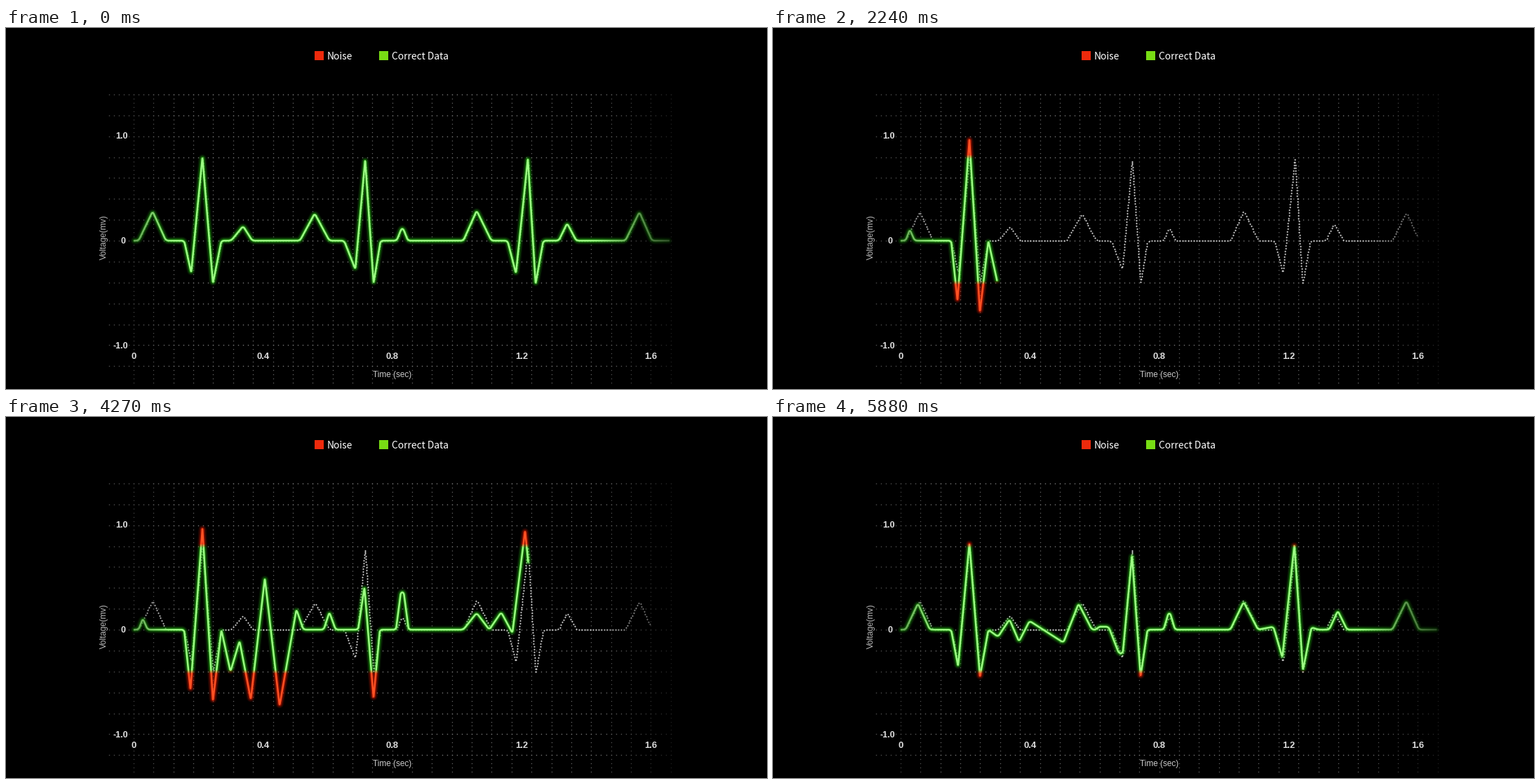
A matplotlib script that plays this animation: 1085 by 516 pixels, repeating every 5950 ms.

```python
import numpy as np
import matplotlib.pyplot as plt
from matplotlib.animation import FuncAnimation
from matplotlib.transforms import Bbox

W, H, DPI = 1085, 516, 100
FRAMES, STEP = 85, 70
FADE_FROM, FADE_TO = 400, 930      # clean trace fades out
DRAW_AT, SPEED = 1216, 0.803       # noisy trace is drawn, px per ms
MORPH_AT, MORPH_LEN = 5293, 707    # noisy trace settles into the clean one
BASE = 304
LEFT, CELL_X = 182, 28.36
TOP, CELL_Y = 95, 29.87

TAIL = [(883, BASE), (903, 263), (921, BASE), (947, BASE)]
NOISY = np.array([
    (182, BASE), (189, BASE), (195, 288), (202, BASE), (254, BASE),
    (263, 390), (280, 158), (295, 406), (307, BASE), (320, 364), (333, 320),
    (349, 404), (369, 230), (390, 413), (414, 275), (424, BASE), (453, BASE),
    (461, 279), (461, 279), (470, BASE), (502, BASE), (511, 243), (524, 402),
    (533, BASE), (556, BASE), (563, 250), (567, 250), (574, BASE),
    (652, BASE), (671, 280), (689, BASE), (706, 279), (722, 309), (740, 162),
    (758, 343), (776, 283), (788, BASE), (817, BASE), (831, 267),
    (845, BASE)] + TAIL, float)
CLEAN = np.array([
    (182, BASE), (189, BASE), (209, 262), (228, BASE), (254, BASE),
    (264, 350), (280, 184), (295, 365), (307, BASE), (321, BASE), (338, 283),
    (351, BASE), (365, BASE), (419, BASE), (440, 265), (461, BASE),
    (463, BASE), (464, BASE), (482, BASE), (498, 345), (498, 345), (512, 188),
    (524, 365), (534, BASE), (557, BASE), (564, 286), (566, 286), (573, BASE),
    (652, BASE), (671, 261), (692, BASE), (715, BASE), (727, 351), (744, 186),
    (755, 366), (766, BASE), (775, BASE), (788, BASE), (800, 279),
    (813, BASE)] + TAIL, float)

GREEN = {"core": (0.62, 1.0, 0.52), "glow": (0.15, 0.70, 0.08)}
RED = {"core": (1.0, 0.32, 0.14), "glow": (0.85, 0.10, 0.0)}
LAYERS = [(11, 0.12, "glow"), (8, 0.22, "glow"),
          (5, 0.5, "glow"), (2.4, 1.0, "core")]
EDGES = [0, 182, 184, 186, 362, 364, 366, H]
REDNESS = [1, 0.67, 0.33, 0, 0.33, 0.67, 1]


def px(size):
    return size * 72 / DPI


def arc_length(pts):
    return np.r_[0, np.cumsum(np.hypot(*np.diff(pts, axis=0).T))]


def resample(pts, step):
    s = arc_length(pts)
    at = np.arange(0, s[-1], step)
    return np.column_stack([np.interp(at, s, pts[:, k]) for k in (0, 1)])


def rounded(pts, reach=4):
    """Sample a polyline every pixel and soften its corners."""
    fine = np.pad(resample(pts, 1), ((reach, reach), (0, 0)), mode="edge")
    box = np.ones(2 * reach + 1) / (2 * reach + 1)
    return np.column_stack([np.convolve(fine[:, k], box, "valid")
                            for k in (0, 1)])


def blend(a, b, k):
    return tuple((1 - k) * np.array(a) + k * np.array(b))


fig = plt.figure(figsize=(W / DPI, H / DPI), dpi=DPI, facecolor="black")
ax = fig.add_axes([0, 0, 1, 1])
ax.axis("off")


def dots(x, y, size, color, marker="s"):
    ax.plot(x, y, ls="none", marker=marker, ms=px(size), mew=0,
            color=color, zorder=1)


def label(x, y, text, size, color, font="Liberation Sans", **kw):
    kw = {"ha": "center", "va": "baseline", **kw}
    ax.text(x, y, text, fontsize=px(size), color=color, family=font,
            zorder=6, **kw)


def draw_grid():
    cols = LEFT + CELL_X * np.arange(28)
    rows = TOP + CELL_Y * np.arange(14)
    vx, vy = np.meshgrid(cols, np.arange(TOP, H - 3, CELL_Y / 5))
    hx, hy = np.meshgrid(np.arange(LEFT - 5 * CELL_X / 4, 948, CELL_X / 4),
                         rows)
    dots(vx.ravel(), vy.ravel(), 1.3, "#646464")
    dots(hx.ravel(), hy.ravel(), 1.4, "#767676")


def draw_shade():
    """Dim the left and right ends of the plot."""
    x = np.arange(W)
    shade = np.zeros((1, W, 4))
    shade[0, :, 3] = np.interp(x, [185, 240, 835, 947], [0.34, 0, 0, 0.7])
    ax.imshow(shade, extent=(0, W, H, 0), aspect="auto", zorder=5,
              interpolation="nearest")


def draw_labels():
    for x, color, name in ((440, "#ee2a0c", "Noise"),
                           (532, "#78dc14", "Correct Data")):
        ax.add_patch(plt.Rectangle((x, 33), 13, 13, color=color, lw=0,
                                   zorder=6))
        label(x + 17.5, 45, name, 13.8, "white", "Noto Sans CJK JP",
              ha="left")
    for k, name in enumerate(("0", "0.4", "0.8", "1.2", "1.6")):
        label(LEFT + 184.3 * k, 473, name, 13, "#dedede", weight="bold")
    for y, name in ((158, "1.0"), (308, "0"), (458, "-1.0")):
        label(174 if name != "0" else 171, y, name, 12.5, "#dedede",
              ha="right", weight="bold")
    label(550.5, 499, "Time (sec)", 11.8, "#cacaca")
    label(140, 299, "Voltage(mv)", 12, "#b8b8b8", va="center", rotation=90)


draw_grid()
clean, noisy = rounded(CLEAN), rounded(NOISY)
path = resample(clean[clean[:, 0] < 919], 4)
dots(path[:, 0], path[:, 1], 2.1, "#dcdcdc", "o")
draw_shade()
draw_labels()
ax.set_xlim(0, W)
ax.set_ylim(H, 0)

# One copy of the trace per colour band and glow layer.
trace = []
for width, alpha, part in LAYERS:
    for y0, y1, red in zip(EDGES, EDGES[1:], REDNESS):
        line, = ax.plot([], [], lw=px(width), zorder=3,
                        solid_capstyle="round", solid_joinstyle="round")
        line.set_clip_box(Bbox.from_extents(0, H - y1, W, H - y0))
        trace.append((line, alpha, part, red))


def curve_at(t):
    """Points, opacity and whether out-of-range parts turn red."""
    if t < DRAW_AT:
        fade = (FADE_TO - t) / (FADE_TO - FADE_FROM)
        return clean, float(np.clip(fade, 0, 1)), False
    if t < MORPH_AT:
        return noisy[:int(SPEED * (t - DRAW_AT)) + 1], 1.0, True
    k = (t - MORPH_AT) / MORPH_LEN
    return rounded(NOISY + k * (CLEAN - NOISY)), 1.0, True


def update(i):
    pts, opacity, warn = curve_at(i * STEP)
    for line, alpha, part, red in trace:
        line.set_data(pts[:, 0], pts[:, 1])
        line.set_color(blend(GREEN[part], RED[part], red * warn))
        line.set_alpha(alpha * opacity)
        line.set_visible(opacity > 0)
    return [item[0] for item in trace]


anim = FuncAnimation(fig, update, frames=FRAMES, interval=STEP, repeat=True,
                     repeat_delay=0, blit=False)
plt.show()
```
